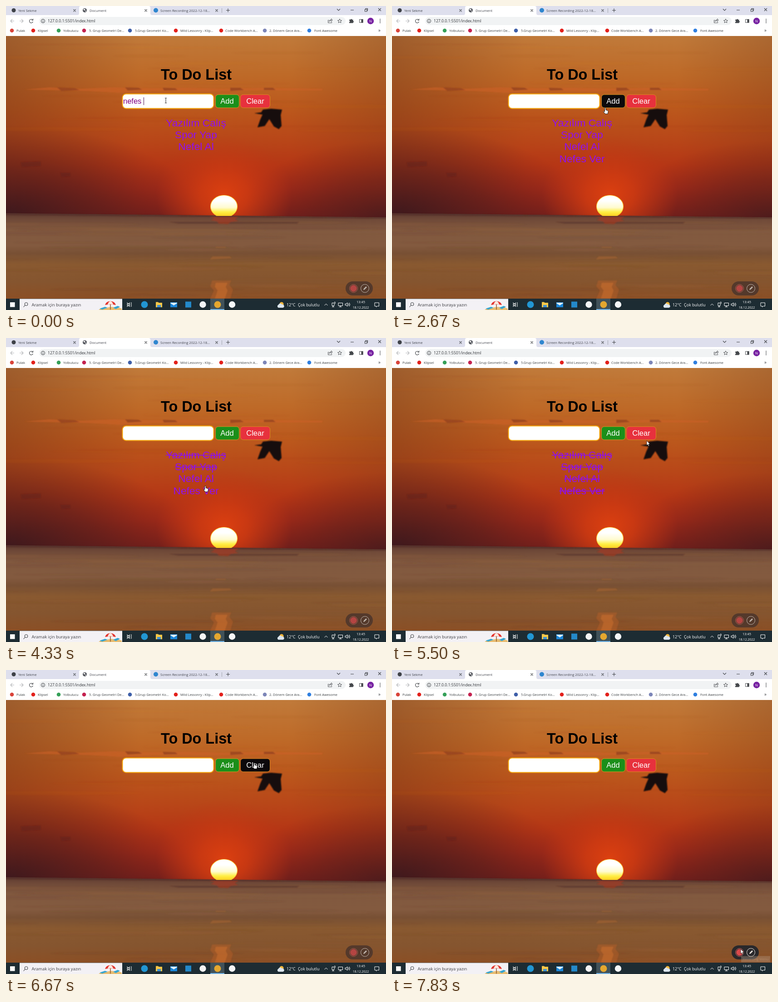
An HTML page for the animation above (8 s loop, 837 by 669 pixels).

```html
<!DOCTYPE html>
<html lang="tr">
<head>
<meta charset="utf-8">
<title>To Do List</title>
<style>
html, body { margin: 0; width: 100%; height: 100%; overflow: hidden; }
svg { position: absolute; left: 0; top: 0; width: 837px; height: 669px; }
.scene { will-change: transform; }
text { font-family: "Open Sans", "Noto Sans", sans-serif; white-space: pre; }
.page text { font-family: "Liberation Sans", Arial, sans-serif; font-size: 16.5px; }
.page .title { font-size: 32.4px; font-weight: bold; }
.page .items text { font-size: 22.8px; fill: #9010ee; }
.items path { stroke: #8d10e4; stroke-width: 1.7; }
.mid { text-anchor: middle; }
.tab { font-size: 7.6px; fill: #45474f; }
.mark { font-size: 7.4px; fill: #3c4043; }
.line { fill: none; stroke: #44474b; stroke-width: 1.1; }
.tray { fill: none; stroke: #fff; stroke-width: 1; }
</style>
</head>
<body>
<svg class="scene" viewBox="0 0 837 669">
  <defs>
    <linearGradient id="sky" x2="0" y2="1">
      <stop offset="0" stop-color="#c07a3a"/><stop offset=".21" stop-color="#be6a28"/>
      <stop offset=".41" stop-color="#bb571c"/><stop offset=".585" stop-color="#b84518"/>
      <stop offset=".71" stop-color="#b53615"/><stop offset=".835" stop-color="#a62b18"/>
      <stop offset=".935" stop-color="#8d2419"/><stop offset="1" stop-color="#7a201b"/>
    </linearGradient>
    <linearGradient id="shade">
      <stop offset="0" stop-color="#6a3018" stop-opacity=".4"/><stop offset=".35" stop-color="#6a3018" stop-opacity="0"/>
      <stop offset=".75" stop-color="#6a3018" stop-opacity="0"/><stop offset="1" stop-color="#6a3018" stop-opacity=".25"/>
    </linearGradient>
    <radialGradient id="dusk">
      <stop offset="0" stop-color="#38171d" stop-opacity=".92"/><stop offset=".5" stop-color="#45191d" stop-opacity=".5"/>
      <stop offset="1" stop-color="#5a1c1c" stop-opacity="0"/>
    </radialGradient>
    <radialGradient id="redGlow">
      <stop offset="0" stop-color="#dc4010"/><stop offset=".35" stop-color="#d03b11" stop-opacity=".85"/>
      <stop offset="1" stop-color="#bf3614" stop-opacity="0"/>
    </radialGradient>
    <linearGradient id="sun" x2="0" y2="1">
      <stop offset=".25" stop-color="#fff"/><stop offset=".55" stop-color="#fffbd0"/>
      <stop offset=".75" stop-color="#ffef45"/><stop offset="1" stop-color="#ffc414"/>
    </linearGradient>
    <linearGradient id="sea" x2="0" y2="1">
      <stop offset="0" stop-color="#5d3a30"/><stop offset=".07" stop-color="#6f4938"/>
      <stop offset=".2" stop-color="#81593f"/><stop offset=".38" stop-color="#835a3f"/>
      <stop offset=".47" stop-color="#785034"/><stop offset=".6" stop-color="#895930"/>
      <stop offset=".8" stop-color="#85552f"/><stop offset="1" stop-color="#8b4f25"/>
    </linearGradient>
    <filter id="soft" x="-20%" y="-50%" width="140%" height="200%"><feGaussianBlur stdDeviation="5 1.5"/></filter>
    <filter id="fuzz"><feGaussianBlur stdDeviation=".8"/></filter>
    <clipPath id="above"><rect y="66" width="837" height="396"/></clipPath>
  </defs>
  <rect y="66" width="837" height="400" fill="url(#sky)"/>
  <rect y="66" width="837" height="400" fill="url(#shade)"/>
  <ellipse cx="0" cy="462" rx="430" ry="200" fill="url(#dusk)"/>
  <ellipse cx="837" cy="466" rx="330" ry="170" fill="url(#dusk)" opacity=".7"/>
  <ellipse cx="480" cy="415" rx="150" ry="130" fill="url(#redGlow)"/>
  <g id="clouds" filter="url(#soft)"></g>
  <g filter="url(#fuzz)">
    <path d="M40 184L95 179 165 182 235 179 320 181 400 180 480 182 560 180 698 182 696 186 560 186 440 188 330 187 250 191 180 187Z" fill="#cb622b" opacity=".6"/>
    <path d="M112 179l40 2 10 4-40 2zM262 179l30 1 8 4-32 2zM345 180l28 1 5 4-30 1zM494 180l22 0 8 5-30 2zM568 180l20 0 6 5-26 0z" fill="#8a3d20" opacity=".65"/>
    <path d="M32 344l45-2 0 10-42 2zM120 367l22 0 0 8-20 1z" fill="#571d20" opacity=".3"/>
  </g>
  <path d="M0 456L837 465V644H0Z" fill="url(#sea)"/>
  <g id="waves" filter="url(#soft)"></g>
  <g filter="url(#fuzz)">
    <path d="M0 456L440 461 837 465V468L440 464 0 460Z" fill="#4a2624" opacity=".5"/>
    <path d="M360 475h285l-4 4H380z" fill="#4d2722" opacity=".4"/>
    <path d="M448 464h64l-8 5 7 4-16 2-6 5-20-1-4-5-14-3 8-4z" fill="#b0351c" opacity=".55"/>
    <path d="M455 551h38l4 4-48 3zM462 530h22v2h-22z" fill="#b36b2e" opacity=".4"/>
    <path d="M454 604l42 0-4 10 8 10-6 20-44 0 8-18-8-9z" fill="#c0622a" opacity=".4"/>
    <path d="M462 609h26l-4 9 4 8-6 18h-22l6-18-6-8z" fill="#dc7830" opacity=".4"/>
  </g>
  <ellipse cx="480" cy="441" rx="29.500" ry="24.500" fill="url(#sun)" stroke="#ffc02c" stroke-width="1.200" clip-path="url(#above)"/>
  <path d="M547 236L562 234 566 228 584 226 608 228 605 240 607 264 601 271 590 265 580 249 570 264 554 267 560 250 565 239Z" fill="#160d0d" filter="url(#fuzz)"/>
</svg>

<svg viewBox="0 0 837 669">
  <g class="page">
    <text class="title mid" x="419" y="162">To Do List</text>
    <rect x="256.5" y="193.5" width="201" height="32" rx="8" fill="#fff" stroke="#f5a50c" stroke-width="2"/>
    <text id="typed" x="258" y="215" fill="#800080"></text>
    <path id="caret" d="M303.5 201V218" stroke="#4a1050"/>
    <rect id="add" x="461.5" y="195" width="52" height="29" rx="6" stroke="#d69a22"/>
    <text class="mid" x="487" y="215" fill="#fff">Add</text>
    <rect id="clear" x="516.5" y="195" width="65" height="29" rx="6" stroke="#e08a20"/>
    <text class="mid" x="549" y="215" fill="#fff">Clear</text>
    <g class="items mid" id="items"></g>

    <rect id="pill" x="748" y="606" width="60" height="31" rx="15.5"/>
    <g id="tools">
      <circle cx="765.5" cy="621.5" r="7.2" fill="#d94a4c"/>
      <circle cx="765.5" cy="621.5" r="8.8" fill="none" stroke="#d96a60"/>
      <circle cx="790.5" cy="621.5" r="9" fill="none" stroke="#e8e2dc"/>
      <path d="M787 625l1-3 5-5 2 2-5 5z" fill="#e8e2dc"/>
    </g>
  </g>

  <!-- browser frame -->
  <rect width="837" height="20" fill="#dedfed"/>
  <rect y="20" width="837" height="46" fill="#fff"/>
  <path d="M157 20q4 0 4-4V4q0-4 4-4H314q4 0 4 4V16q0 4 4 4Z" fill="#fff"/>
  <rect x="73" y="24" width="675" height="18" rx="9" fill="#f1f3f4"/>
  <circle cx="17" cy="9.5" r="4.5" fill="#3f4248"/>
  <circle cx="173.5" cy="9.5" r="4.5" fill="#50535a"/>
  <path d="M170 8l3-2 2 2-2 2zM174 11l3-1-2 3z" fill="#fff"/>
  <circle cx="330" cy="9.5" r="5" fill="#2f86cf"/>
  <text class="tab" x="27" y="12.5">Yeni Sekme</text>
  <text class="tab" x="184" y="12.5">Document</text>
  <text class="tab" x="340" y="12.5">Screen Recording 2022-12-18...</text>
  <path class="line" d="M148.5 7.5l5 5m0-5l-5 5M305.5 7.5l5 5m0-5l-5 5M461.5 7.5l5 5m0-5l-5 5M489 5.5v8m-4-4h8M729 6.5l3.5 3.5 3.5-3.5M759 9h7M790.5 7.5h4.5v4.5h-4.500zM792 7V5.5h4.5V10H795.5M820 5l6 6m0-6l-6 6"/>
  <path d="M475.5 5v10" stroke="#a5a7b0"/>
  <path class="line" style="stroke:#b5b7ba" d="M18 33H10m4-4l-4 4 4 4M30 33h8m-4-4l4 4-4 4"/>
  <path class="line" d="M58.5 30.5a4 4 0 1 0 .8 4M59.5 28v3.2H56.3"/>
  <circle class="line" cx="81.5" cy="33" r="4"/>
  <path class="line" d="M81.5 32v3.5M81.5 30.2v1"/>
  <text x="92" y="36.2" font-size="8.65" fill="#303338">127.0.0.1:5501/index.html</text>
  <path class="line" style="stroke-width:.9" d="M711 31h-1.5v6h8v-2M711.5 34q1-4 5-4v-2l2.5 3-2.5 3v-2q-3 0-5 2M735 28.5l1.3 3 3.2.2-2.5 2.1.9 3.2-2.9-1.8-2.9 1.8.9-3.2-2.5-2.1 3.2-.2zM778.5 29.5h7.5v7h-7.5z"/>
  <path d="M756 30h3a1.5 1.5 0 1 1 3 0h2.5v3a1.5 1.5 0 1 1 0 3V37.5H756V35a1.5 1.5 0 1 0 0-3zM782.5 29h4v8h-4z" fill="#44474b"/>
  <circle cx="803" cy="33" r="7.2" fill="#7722a2"/>
  <text class="mid" x="803" y="36" font-size="8" fill="#fff">N</text>
  <path d="M824 28.5v9" stroke="#44474b" stroke-width="1.8" stroke-dasharray="1.8 1.8"/>
  <g id="marks"></g>
  <text x="820" y="57" font-size="10" fill="#3c4043">»</text>

  <!-- taskbar -->
  <rect y="644" width="837" height="25" fill="#1d2c33"/>
  <rect x="9" y="652" width="10.5" height="10.5" fill="#fff"/>
  <rect x="30" y="644.5" width="226" height="24.5" fill="#f3f1f5"/>
  <circle cx="44.5" cy="656" r="3.3" class="line"/><path class="line" d="M42 658.5l-3.5 4"/>
  <text x="56.5" y="661" font-size="9.4" fill="#3b3b40">Aramak için buraya yazın</text>
  <path d="M204 669q6-5 16-4 8-4 18-2 9-1 17 3v3z" fill="#e8bd72"/>
  <path d="M230 652v16" stroke="#8a5630" stroke-width="1.5"/>
  <path d="M218 658q2-8 12-8.5 10 .5 12 8.5-12-3-24 0z" fill="#e3352f"/>
  <path d="M224 657q1-6 6-7.5 5 1.5 6 7.5-6-1.5-12 0z" fill="#fbe9df"/>
  <path d="M206 666l12-4 6 2-12 4zM236 664l10-4 5 2-9 5z" fill="#35a4cf"/>
  <path class="tray" d="M267 652.5v2h5.5v-2M267 662v-2h5.5v2M267 656h5.5v2.5H267zM276 652v10"/>
  <rect x="450" y="644" width="31" height="25" fill="#41525a"/>
  <path d="M450 668h31" stroke="#76b9ed" stroke-width="2"/>
  <circle cx="305" cy="657" r="7.5" fill="#2296d3"/>
  <path d="M330 651.5h5l1.5 1.5H344v10H330z" fill="#f7c748"/><path d="M333 658h8v5h-8z" fill="#3f91d4"/>
  <rect x="362" y="652" width="15" height="11" fill="#1b86d8"/>
  <path d="M362 654l7.5 5 7.5-5v-1h-15z" fill="#dff0fb"/>
  <rect x="395" y="650.5" width="13" height="13" fill="#2489ca"/>
  <circle cx="433.5" cy="657" r="7.2" fill="#f4f4f4"/>
  <circle cx="466" cy="657" r="7.5" fill="#e5a72f"/>
  <circle cx="498" cy="657" r="7.2" fill="#f5f7f8"/>
  <circle cx="607" cy="656" r="4.5" fill="#f5b73c"/>
  <path d="M600 664a3.5 3.5 0 0 1 0-6.5 4.5 4.5 0 0 1 8-.5 3.5 3.5 0 0 1 2 7z" fill="#dce6ef"/>
  <text x="618" y="661" font-size="8.9" fill="#fff">12°C</text>
  <text x="643" y="661" font-size="8.9" fill="#fff">Çok bulutlu</text>
  <path class="tray" d="M701.5 659l3.5-3.5 3.5 3.5M718 653.5h5v6h-5zM720.5 659.5v3M718 662h5M723 651.5h2v4M732 653.5h9.5v6H732zM736.5 659.5v3M733.5 662h6M747 655.5h2l3-2.5v8l-3-2.5h-2zM754 654.5q2 2.5 0 5M756 653q3 4 0 8M812 653h9.5v7.5h-4l-2 2v-2H812z"/>
  <text class="mid" x="781.5" y="653.5" font-size="7.4" fill="#fff">13:45</text>
  <text class="mid" x="781.5" y="665.5" font-size="7" fill="#fff">18.12.2022</text>

  <g id="tip">
    <rect x="769" y="629.5" width="64" height="13.5" fill="#b09a86"/>
    <text class="mid" x="801" y="639" font-size="7.4" fill="#f0e0d0">Recording Menu</text>
  </g>
  <g id="pointer">
    <path id="beam" d="M-2-5.5H-.5L0-5 .5-5.5H2M0-5V5M-2 5.5H-.5L0 5 .5 5.5H2" fill="none" stroke="#222"/>
    <path id="hand" d="M-1.2 1Q0-1 1.2 1V5L5.3 6.2Q6.7 6.8 6.4 9L5.4 13.5H-.2L-4 8.8Q-3.4 7-1.2 8.8Z" fill="#fff" stroke="#111" stroke-width=".9"/>
    <path id="arrow" d="M0 0V10.2L2.3 8.2 4 12 5.6 11.3 4 7.6H7.2Z" fill="#fff" stroke="#111" stroke-width=".7"/>
  </g>
</svg>
<script>
const $ = id => document.getElementById(id);

// Seeded streaks of cloud and water
let seed = 11;
const rnd = () => (seed = seed * 16807 % 2147483647) / 2147483647;
function streaks(n, top, height, colors, strength) {
  let out = '';
  for (let i = 0; i < n; i++) {
    const w = 60 + rnd() * 170;
    out += `<ellipse cx="${rnd() * 837}" cy="${top + rnd() * height}" rx="${w}" ry="${1 + rnd() * 3}" fill="${colors[i % colors.length]}" opacity="${(.3 + rnd() * .7) * strength}"/>`;
  }
  return out;
}
$('clouds').innerHTML = streaks(20, 75, 200, ['#8a3d1c', '#cf6b2c'], .09);
$('waves').innerHTML = streaks(40, 474, 165, ['#5e3c2c', '#9a6a48', '#a3683a'], .16);

const bookmarks = [
  [13, 23, '#d9443a', 'Pulak'], [60, 70, '#e3211c', 'Klipsel'], [116, 126, '#35a058', 'Yolbulucu'],
  [172, 183, '#c4224f', '5. Grup Geometri De...'], [273, 284, '#3e5fa8', '5.Grup Geometri Ko...'],
  [374, 384, '#e3211c', 'Mild Lessonry - Klip...'], [474, 483, '#e3211c', 'Code Workbench A...'],
  [570, 580, '#7d86b8', '2. Dönem Gece Ara...'], [668, 679, '#2f7fe0', 'Font Awesome']
];
$('marks').innerHTML = bookmarks.map(([icon, x, color, name]) =>
  `<circle cx="${icon}" cy="54" r="4.3" fill="${color}"/><text class="mark" x="${x}" y="56.5">${name}</text>`).join('');

// [label, shown from, struck from]
const todos = [['Yazılım Calış', 0, 3500], ['Spor Yap', 0, 4000], ['Nefel Al', 0, 5000], ['Nefes Ver', 2170, 4500]];
const cleared = 6000;
$('items').innerHTML = todos.map(([name], i) =>
  `<g transform="translate(418.5 ${264.7 + i * 26.3})"><text>${name}</text><path/></g>`).join('');
const rows = [...$('items').children];
for (const { firstChild: label, lastChild: strike } of rows) {
  const w = label.getComputedTextLength();
  strike.setAttribute('d', `M${-w / 2} -6.9h${w}`);
}

// Pointer path: [ms, x, y]
const path = [
  [0, 352, 208], [1500, 352, 208], [1670, 408, 209], [1830, 455, 208], [2000, 480, 206], [2330, 482, 206],
  [2500, 480, 212], [2830, 460, 235], [3170, 437, 254], [3330, 435, 256], [3500, 435, 256],
  [3830, 437, 280], [4000, 437, 281], [4170, 437, 281], [4330, 439, 325], [4500, 440, 330], [4670, 440, 328],
  [4830, 441, 308], [5000, 442, 306], [5170, 450, 302], [5330, 515, 262], [5500, 561, 226],
  [5670, 551, 209], [5830, 547, 204], [6670, 547, 204], [6830, 556, 232], [7170, 660, 430],
  [7500, 766, 612], [7670, 768, 614], [8000, 768, 614]
];
function pointerAt(t) {
  const i = Math.max(1, path.findIndex(p => p[0] >= t));
  const [t0, x0, y0] = path[i - 1], [t1, x1, y1] = path[i], k = (t - t0) / (t1 - t0);
  return [x0 + (x1 - x0) * k, y0 + (y1 - y0) * k];
}
const show = (el, on) => { el.style.display = on ? '' : 'none'; };

function draw(t) {
  const [x, y] = pointerAt(t);
  const over = (l, top, r, b) => x >= l && x <= r && y >= top && y <= b;
  const onAdd = over(461, 195, 514, 224), onClear = over(516, 195, 582, 224);
  const onList = t < cleared && over(352, 246, 485, 350), onInput = over(256, 193, 457, 226);
  const onPill = over(748, 606, 808, 637);

  const letters = (t >= 330) + (t >= 500) + (t >= 830);
  $('typed').textContent = t < 2170 ? 'nefes ver'.slice(0, 6 + letters) : '';
  $('caret').setAttribute('transform', `translate(${[0, 8.2, 17.4, 22.9][letters]})`);
  show($('caret'), t < 1170);
  rows.forEach((row, i) => {
    const [, shown, struck] = todos[i];
    show(row, t >= shown && t < cleared);
    show(row.lastChild, t >= struck);
  });

  $('add').style.fill = onAdd ? '#0c090b' : '#1b8f1a';
  $('clear').style.fill = onClear ? '#0c090b' : '#e7313d';
  $('pill').style.fill = onPill ? '#29282b' : '#54392b';
  $('tools').style.opacity = onPill ? 1 : .72;
  $('tip').style.opacity = t < 7670 ? 0 : t < 7830 ? .12 : .38;

  $('pointer').setAttribute('transform', `translate(${x} ${y})`);
  show($('beam'), onInput);
  show($('hand'), onAdd || onClear || onList);
  show($('arrow'), !(onInput || onAdd || onClear || onList));
}

// The screen refreshes six times a second, on 10 ms marks
const start = performance.now();
function tick(now) {
  const t = Math.max(0, now - start) % 8000;
  draw(Math.round(Math.floor((t + 4) * .006) % 48 / .06) * 10);
  requestAnimationFrame(tick);
}
draw(0);
requestAnimationFrame(tick);
</script>
</body>
</html>
```
